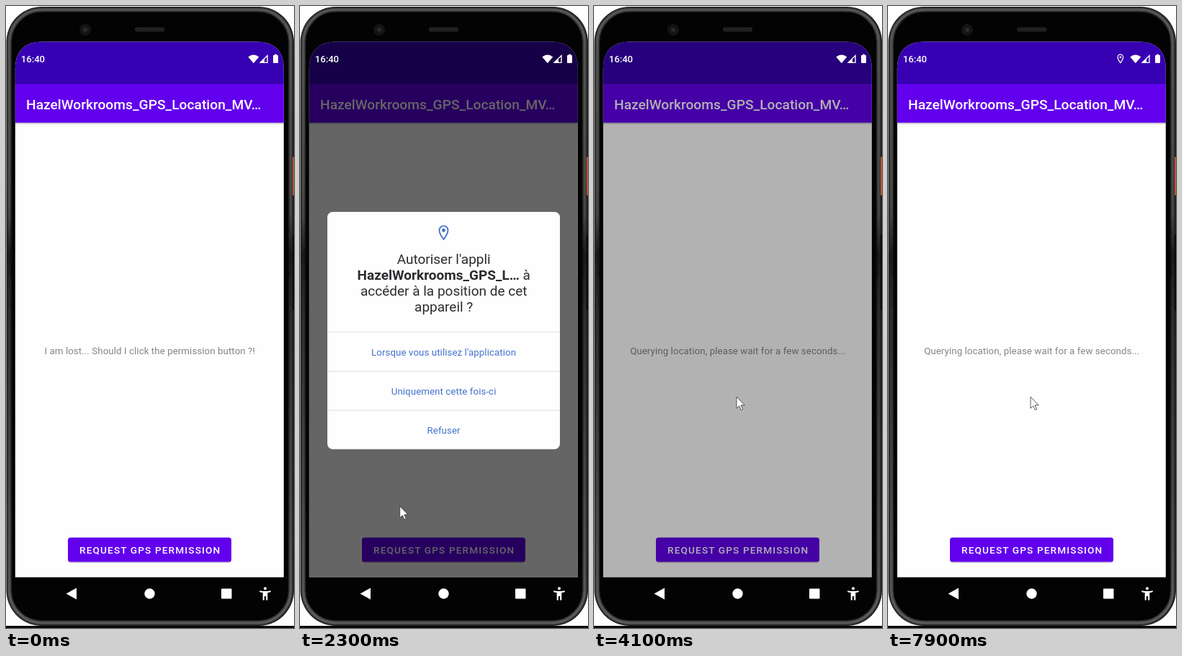
These frames come from a looping animation (400x861 px, 8 s). An HTML page:

```html
<!DOCTYPE html>
<html lang="en">
<head>
<meta charset="utf-8">
<title>Location permission</title>
<style>
  html, body { margin: 0; width: 100%; height: 100%; overflow: hidden; background: #fff; }
  svg { display: block; width: 100vw; height: 100vh; }
  text { font-family: Roboto, "Noto Sans", sans-serif; font-size: 13.3px; }
  .clock { font-size: 13.1px; font-weight: 500; }
  .title { font-size: 19.2px; font-weight: 500; }
  .button { font-size: 13.6px; font-weight: 500; letter-spacing: 1.15px; }
  .center { text-anchor: middle; }
  .question { font-size: 19px; fill: #2b2c2f; }
  .choice { fill: #4272cc; letter-spacing: .07px; }
</style>
</head>
<body>
<svg viewBox="0 0 400 861">
  <defs>
    <linearGradient id="shade" x2="0" y2="1">
      <stop offset="0" stop-color="#000" stop-opacity=".22"/>
      <stop offset="1" stop-color="#000" stop-opacity="0"/>
    </linearGradient>
    <linearGradient id="metal" x2="0" y2="1">
      <stop offset="0" stop-color="#606060"/>
      <stop offset=".33" stop-color="#505050"/>
      <stop offset=".4" stop-color="#1c1c1c"/>
      <stop offset=".5" stop-color="#333"/>
      <stop offset="1" stop-color="#666"/>
    </linearGradient>
    <filter id="soft" x="-5%" y="-5%" width="110%" height="110%"><feGaussianBlur stdDeviation="1"/></filter>
    <clipPath id="bodyClip"><rect x=".5" y="1" width="399.5" height="857" rx="49"/></clipPath>
    <clipPath id="screenClip"><path d="M12.8 790.7V87Q12.8 49.5 51 49.5H348Q385.8 49.5 385.8 87V790.7Z"/></clipPath>
    <clipPath id="rowClip"><rect x="38" y="506" width="323" height="54"/></clipPath>
    <path id="pin" d="M0 9.5C-4.2 4.2-6-.2-6-3.2A6 6 0 0 1 6-3.2C6-.2 4.2 4.2 0 9.5Z"/>
  </defs>

  <!-- phone body -->
  <rect width="400" height="861" fill="#fefefe"/>
  <rect y="858" width="400" height="3" fill="#080808"/>
  <g clip-path="url(#bodyClip)">
    <rect width="400" height="861" fill="#1b1b1b"/>
    <rect x="4.5" y="5" width="391" height="849" rx="45" fill="#0a0a0a" stroke="url(#metal)" stroke-width="3.6" filter="url(#soft)"/>
    <rect x="8.5" y="9" width="383" height="841" rx="41" fill="#040304"/>
  </g>
  <rect x="398" y="209" width="2" height="53" fill="#b4553a"/>
  <rect x="398" y="317" width="2" height="104" fill="#080808"/>
  <circle cx="110" cy="33" r="8" fill="#141414"/>
  <circle cx="110" cy="33" r="3" fill="#292a2d"/>
  <rect x="179" y="29.5" width="41" height="6" rx="2" fill="#202020"/>

  <!-- app -->
  <g clip-path="url(#screenClip)">
    <rect x="12" y="49" width="375" height="742" fill="#fefefe"/>
    <rect x="12" y="49" width="375" height="59" fill="#3700b3"/>
    <rect x="12" y="108" width="375" height="53.6" fill="#6200ee"/>
    <rect x="12" y="161.6" width="375" height="3" fill="url(#shade)"/>
    <text class="title" x="28" y="142.8" fill="#fff">HazelWorkrooms_GPS_Location_MV…</text>
    <text id="message" class="center" x="199.7" y="481.7" fill="#858585" letter-spacing=".07"></text>
    <rect x="86" y="738" width="227" height="33" rx="4" fill="#000" opacity=".16"/>
    <rect x="86" y="735.8" width="227" height="33.7" rx="3.5" fill="#6200ee"/>
    <rect id="press" x="86" y="735.8" width="227" height="33.7" rx="3.5" fill="#fff"/>
    <text class="button center" x="200.2" y="757.9" fill="#fff">REQUEST GPS PERMISSION</text>
    <rect id="dim" x="12" y="49" width="375" height="742"/>
  </g>

  <!-- system bars -->
  <g fill="#fff">
    <text class="clock" x="20.8" y="78.2">16:40</text>
    <path d="M336.3 70.4Q343.8 64.4 351.3 70.4L343.8 79.2Z"/>
    <path d="M353.2 78.4L363 68.6V78.4Z" fill="none" stroke="#fff" stroke-width="1.4"/>
    <path d="M352 79L359 72V79Z"/>
    <path d="M371 69Q371 68 372 68H373V66.7H376V68H377Q378 68 378 69V78Q378 79 377 79H372Q371 79 371 78Z"/>
    <g id="located" transform="translate(322.8 72.8) scale(.62)">
      <use href="#pin" fill="none" stroke="#fff" stroke-width="2"/>
      <circle cy="-3" r="2.2"/>
    </g>
    <path d="M83.5 813.5L98 805.5V821.5Z"/>
    <circle cx="199.5" cy="813.5" r="7.2"/>
    <rect x="299" y="806.5" width="14.5" height="14" rx="1"/>
    <circle cx="360" cy="806.3" r="2"/>
    <path d="M352.5 809.2Q360 811 367.5 809.2L368 811Q365.6 811.8 363.3 812V822.5H361.2V817H358.8V822.5H356.7V812Q354.4 811.8 352 811Z"/>
  </g>

  <!-- permission dialog -->
  <g id="dialog">
    <rect x="38" y="285" width="323" height="328.5" rx="7.5" fill="#fefefe"/>
    <g clip-path="url(#rowClip)"><circle id="ripple" cx="200" cy="541" fill="#000" opacity=".06"/></g>
    <g transform="translate(199.5 313.5)" fill="#3f70cc">
      <use href="#pin" fill="none" stroke="#3f70cc" stroke-width="1.8"/>
      <circle cy="-3" r="2.4"/>
    </g>
    <g class="center">
      <text class="question" x="199.7" y="357.3">Autoriser l'appli</text>
      <text class="question" x="199.7" y="379.3"><tspan font-weight="700">HazelWorkrooms_GPS_L…</tspan> à</text>
      <text class="question" x="199.7" y="401.3">accéder à la position de cet</text>
      <text class="question" x="199.7" y="423.3">appareil ?</text>
      <text class="choice" x="199.6" y="483.7">Lorsque vous utilisez l'application</text>
      <text class="choice" x="199.6" y="537.9">Uniquement cette fois-ci</text>
      <text class="choice" x="199.6" y="592">Refuser</text>
    </g>
    <path d="M38 451H361M38 505.5H361M38 559.5H361" stroke="#dedede"/>
  </g>

  <path id="cursor" d="M0 0V16L3.7 12.6L6.2 18.2L8.6 17.1L6.1 11.6H11.2Z" fill="#fff" stroke="#333" stroke-width=".8"/>
</svg>
<script>
const LOOP = 8000, STEP = 50;
const el = id => document.getElementById(id);
const [message, press, dim, located, dialog, ripple, cursor] =
  ["message", "press", "dim", "located", "dialog", "ripple", "cursor"].map(el);

const ramp = (t, from, to) => Math.min(1, Math.max(0, (t - from) / (to - from)));
const smooth = p => p * p * (3 - 2 * p);
const easeOut = p => 1 - (1 - p) ** 2;
const mix = (a, b, p) => a + (b - a) * p;
const show = (node, visible) => node.setAttribute("visibility", visible ? "visible" : "hidden");

function cursorAt(t) {
  const enter = easeOut(ramp(t, 1200, 1450));
  const travel = smooth(ramp(t, 2050, 2785));
  return [mix(mix(70, 117, enter), 198, travel), mix(mix(861, 748, enter), 541, travel)];
}

function draw(t) {
  const opened = ramp(t, 1500, 1650), closed = ramp(t, 3930, 4070);
  const slide = 48 * (1 - easeOut(opened)) + 51 * easeOut(ramp(t, 3830, 4060));
  show(dialog, t > 1500 && t < 4070);
  dialog.setAttribute("opacity", opened * (1 - closed));
  dialog.setAttribute("transform", `translate(0 ${slide})`);

  dim.setAttribute("opacity", .6 * (ramp(t, 1600, 2000) - ramp(t, 3900, 4300)));
  press.setAttribute("opacity", .2 * (ramp(t, 1400, 1500) - ramp(t, 1500, 1700)));
  ripple.setAttribute("r", t < 3800 ? 0 : mix(30, 100, ramp(t, 3800, 4000)));

  message.textContent = t < 3900
    ? "I am lost... Should I click the permission button ?!"
    : "Querying location, please wait for a few seconds...";
  show(located, t >= 4700);
  show(cursor, t >= 1250);
  cursor.setAttribute("transform", `translate(${cursorAt(t)})`);
}

const start = performance.now();
function tick() {
  const t = (performance.now() - start) % LOOP;
  draw(Math.floor(t / STEP) * STEP);
  requestAnimationFrame(tick);
}
tick();
</script>
</body>
</html>
```
